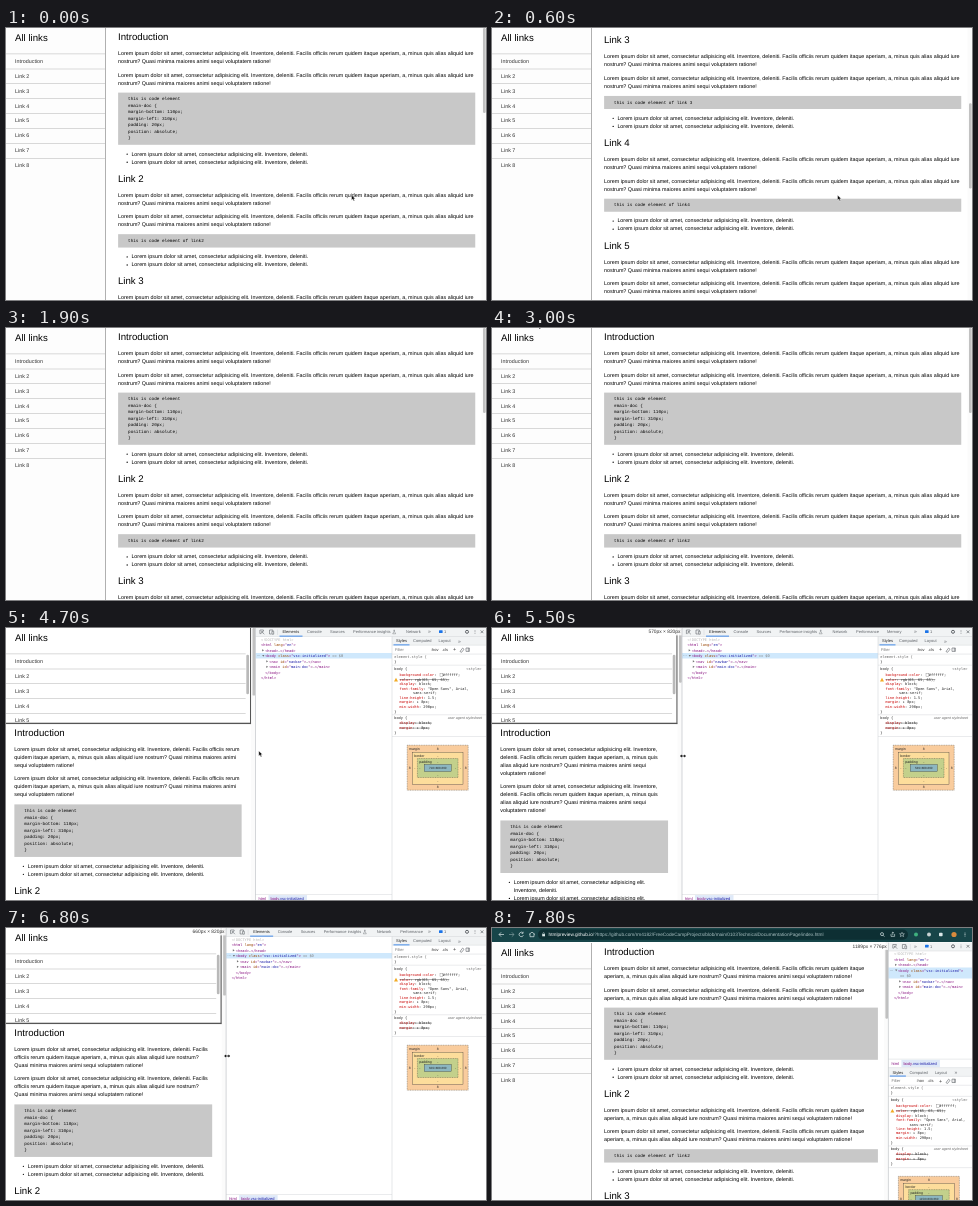
Write an HTML page that moves like this. It is 480x272 px and loops after 7.9 s.

```html
<!DOCTYPE html>
<html lang="en">
<head>
<meta charset="utf-8">
<title>Documentation page</title>
<style>
html, body { margin: 0; width: 100%; height: 100%; overflow: hidden; background: #fff; }
#stage { position: absolute; left: 0; top: 0; width: 480px; height: 272px; overflow: hidden; background: #fff; }
#view { position: absolute; left: 0; height: 272px; overflow: hidden; background: #fff; }
#page { position: absolute; left: 0; top: 0; height: 820px; transform-origin: 0 0; color: #000;
  font: 16px/1.5 "Liberation Sans", Arial, sans-serif; text-rendering: geometricPrecision; }
h2 { margin: 0; font-size: 28.8px; font-weight: 400; }
p, ul { margin: 16px 0; }
main ul { padding-left: 40px; }
main h2 { margin-top: 16px; }
main, nav { position: absolute; }
pre { margin: 16px 0; padding: 10px 30px; background: #c8c8c8; overflow: hidden;
  font: 13px/19.5px "Liberation Mono", "Courier New", monospace; }
nav { left: 0; top: 0; width: 296px; height: 100%; background: #fdfdfd; border-right: 2px solid #8a8a8a; overflow: hidden; }
nav h2 { position: absolute; left: 27px; top: 8px; }
nav ul { position: absolute; left: 0; right: 0; top: 77px; margin: 0; padding: 0; list-style: none; }
nav li { height: 43.5px; line-height: 43.5px; padding-left: 27px; border-top: 1px solid #8c8c8c; color: #333; }
nav i { position: absolute; display: none; right: 3px; top: 80px; width: 8px; height: 118px; border-radius: 4px; background: #b9b9b9; }
.narrow nav { height: 283px; background: #fff; border-right: 4px solid #555; border-bottom: 4px solid #555; }
.narrow nav ul { right: 13px; }
.narrow nav i { display: block; }
svg { position: absolute; left: 0; top: 0; }
svg text { white-space: pre; text-rendering: geometricPrecision; }
</style>
</head>
<body>
<div id="stage">
  <div id="view"><div id="page"><main></main><nav></nav></div></div>
  <svg id="ui" width="480" height="272" viewBox="0 0 480 272"></svg>
</div>
<script>
const LOOP = 7900, K = 0.3347, BAR = 14.5, DOC = 870;
const SANS = '"Liberation Sans", Arial, sans-serif';
const MONO = '"DejaVu Sans Mono", "Liberation Mono", monospace';
const $ = s => document.querySelector(s);
const view = $('#view'), page = $('#page'), main = $('main'), nav = $('nav'), ui = $('#ui');

// ---- page content
const lorem = 'Lorem ipsum dolor sit amet, consectetur adipisicing elit. Inventore, deleniti.';
const para = `<p>${lorem} Facilis officiis rerum quidem itaque aperiam, a, minus quis alias aliquid iure nostrum? Quasi minima maiores animi sequi voluptatem ratione!</p>`;
const names = ['Introduction', ...[2, 3, 4, 5, 6, 7, 8].map(n => 'Link ' + n)];
const code = i => i
  ? `this is code element of link${i === 2 ? ' ' : ''}${i + 1}`
  : 'this is code element\n#main-doc {\nmargin-bottom: 110px;\nmargin-left: 310px;\npadding: 20px;\nposition: absolute;\n}';
main.innerHTML = names.map((n, i) =>
  `<h2${i ? '' : ' style="margin:0"'}>${n}</h2>${para}${para}<pre>${code(i)}</pre><ul><li>${lorem}</li><li>${lorem}</li></ul>`).join('');
nav.innerHTML = '<h2>All links</h2><ul>' + names.map(n => `<li>${n}</li>`).join('') + '</ul><i></i>';

// ---- timing
const ease = u => u * u * (3 - 2 * u);
function track(t, keys, f = u => u) {
  if (t <= keys[0][0]) return keys[0][1];
  for (let i = 1; i < keys.length; i++) {
    const [a, x] = keys[i - 1], [b, y] = keys[i];
    if (t <= b) return x + (y - x) * f((t - a) / (b - a));
  }
  return keys[keys.length - 1][1];
}
const scrollAt = t => t < 700
  ? track(t, [[100, 0], [600, 241]], ease)
  : t < 1200 ? track(t, [[700, 241], [900, 598]]) : track(t, [[1200, 598], [1900, 0]], ease);
const barAt = t => track(t, [[2100, 0], [2400, 1], [2500, 1], [2900, 0], [7400, 0], [7700, 1]], ease);
const splitAt = t => t < 4200 ? 480
  : track(t, [[4800, 249.5], [5500, 190], [6000, 143], [6300, 121], [6500, 132], [7400, 396.4]]);

// ---- drawing helpers
const rect = (x, y, w, h, fill, more = '') => `<rect x="${x}" y="${y}" width="${w}" height="${h}" fill="${fill}" ${more}/>`;
const path = (d, stroke = '#5f6368', w = 0.7, fill = 'none') => `<path d="${d}" stroke="${stroke}" stroke-width="${w}" fill="${fill}"/>`;
const dot = (x, y, r, fill, more = '') => `<circle cx="${x}" cy="${y}" r="${r}" fill="${fill}" ${more}/>`;
const text = (x, y, s, size = 4, fill = '#333', font = SANS, more = '') =>
  `<text x="${x}" y="${y + size * 0.35}" font-size="${size}" fill="${fill}" font-family='${font}' ${more}>${s}</text>`;
const mono = (x, y, s, fill = '#222', more = '') => text(x, y, s, 3.6, fill, MONO, more);
const ink = (fill, s) => `<tspan fill="${fill}">${s}</tspan>`;
const TAG = '#881280';
const open = (tag, attr, val) => ink(TAG, '&lt;' + tag) +
  (attr ? ' ' + ink('#994500', attr) + ink(TAG, '="') + ink('#1a1aa6', val) + ink(TAG, '"') : '') + ink(TAG, '&gt;');
const close = tag => ink(TAG, `&lt;/${tag}&gt;`);
const arrow = (x, y, down) => path(down
  ? `M${x} ${y - 0.8}h2.2l-1.1 1.8z` : `M${x} ${y - 1.1}v2.2l1.8 -1.1z`, 'none', 0, '#6e6e6e');
const gear = (x, y) => dot(x, y, 1.5, 'none', 'stroke="#5f6368" stroke-width="1"');
const cross = (x, y) => path(`M${x - 1.4} ${y - 1.4}l2.8 2.8m0 -2.8l-2.8 2.8`);

// ---- developer tools
const tabs = [['Elements', 27, 17], ['Console', 51.5, 17], ['Sources', 74.5, 15], ['Performance insights', 97.5, 42],
  ['Network', 150.5, 16], ['Performance', 174, 24], ['Memory', 205, 15], ['Application', 228, 20], ['Security', 256, 15]];

function header(x, y) {
  let s = rect(x, y, 480 - x, 8.5, '#f1f3f4') + path(`M${x} ${y + 8.5}H480`, '#cacdd1', 0.4);
  s += path(`M${x + 8} ${y + 3}v-1h-3.6v3.6h1.2M${x + 6.2} ${y + 3.6}l2.6 2.6m-2.6 -2.6v1.8m0 -1.8h1.8`, '#5f6368', 0.6);
  s += path(`M${x + 14} ${y + 2}h3.4v1m-3.4 -1v4h1.8M${x + 16.4} ${y + 3.4}h1.8v2.8h-1.8z`, '#5f6368', 0.6);
  s += path(`M${x + 22} ${y + 1.5}v5.5`, '#cacdd1', 0.4);
  for (const [name, dx, w] of tabs) {
    if (x + dx + w > 420) break;
    s += text(x + dx, y + 3.8, name, 4, dx === 27 ? '#222' : '#5f6368');
    if (dx === 27) s += rect(x + dx - 3, y + 7.7, w + 6, 0.8, '#1a73e8');
    if (w === 42) s += path(`M${x + dx + 40.5} ${y + 2.2}h1.4m-1 0v1.4l-1.2 2.2h3l-1.2 -2.2v-1.4`, '#5f6368', 0.4);
  }
  s += text(422, y + 3.6, '»', 5, '#5f6368');
  s += rect(433, y + 2.2, 3.6, 2.8, '#1a73e8', 'rx=".5"') + text(438, y + 3.8, '1', 4, '#5f6368');
  s += gear(461, y + 3.8) + cross(476, y + 3.8);
  for (const d of [-1.4, 0, 1.4]) s += dot(469, y + 3.8 + d, 0.45, '#5f6368');
  return s;
}

function tree(x, y, right) {
  const wrap = right - x < 95, step = 5.5;
  const row = (n, dx, s, ar) => (ar ? arrow(x + dx - 3, y + n * step, ar === 2) : '') + mono(x + dx, y + n * step, s);
  const more = ink('#888', '…'), d = wrap ? 1 : 0;
  return mono(x + 5.5, y, '&lt;!DOCTYPE html&gt;', '#b5b5b5') +
    rect(x, y + 3 * step - 2.8, right - x, step * (1 + d), '#cfe8fc') +
    row(1, 5.5, open('html', 'lang', 'en')) +
    row(2, 9.7, open('head') + more + close('head'), 1) +
    text(x + 1, y + 3 * step - 1, '…', 4, '#5f6368') +
    row(3, 9.7, open('body', 'class', 'vsc-initialized') + (wrap ? '' : ink('#777', ' == $0')), 2) +
    (wrap ? row(4, 11.5, ink('#777', '== $0')) : '') +
    row(4 + d, 13.8, open('nav', 'id', 'navbar') + more + close('nav'), 1) +
    row(5 + d, 13.8, open('main', 'id', 'main-doc') + more + close('main'), 1) +
    row(6 + d, 9.7, close('body')) + row(7 + d, 5.5, close('html'));
}

function crumbs(x, y, right) {
  return rect(x, y, right - x, 8.5, '#fff') + path(`M${x} ${y}H${right}`, '#cacdd1', 0.4) +
    text(x + 3, y + 4, 'html', 4, TAG) + rect(x + 13, y + 0.6, 38.5, 7.4, '#dfe9f8') +
    text(x + 15, y + 4, ink(TAG, 'body') + '.vsc-initialized', 4, '#1a1aa6');
}

function boxModel(cx, y, w) {
  const ring = (hw, top, h, fill, label, n, dash) =>
    rect(cx - hw, y + top, hw * 2, h, fill, `stroke="#333" stroke-width=".35" ${dash ? 'stroke-dasharray="1 .7"' : ''}`) +
    (label ? text(cx - hw + 1.8, y + top + 3.3, label, 3.5, '#222') : '') +
    (n ? [[0, top + 3.4], [0, top + h - 2.9], [2.5 - hw, top + h / 2], [hw - 2.5, top + h / 2]]
      .map(([dx, dy]) => text(cx + dx, y + dy, n, 3.3, '#222', SANS, 'text-anchor="middle"')).join('') : '');
  return ring(30.5, 0, 45, '#f9cc9d', 'margin', '8', true) + ring(25.3, 7, 32, '#fddd9b', 'border', '-') +
    ring(20.3, 13.3, 19, '#c3d08b', 'padding', '-', true) + ring(13.5, 19.3, 7, '#8cb6c0') +
    text(cx, y + 22.8, `${Math.round((w - 5) * 3 - 16)}×808.660`, 3, '#222', SANS, 'text-anchor="middle"');
}

function styles(x, y, w) {
  const line = dy => path(`M${x} ${y + dy}H480`, '#cacdd1', 0.4);
  const prop = (dy, name, val, off) => mono(x + 7.5, y + dy, ink('#c80000', name) + ': ' + val + ';', '#222',
    off ? 'text-decoration="line-through"' : '');
  const plain = (dx, dy, s, fill) => mono(x + dx, y + dy, s, fill);
  return rect(x, y, 480 - x, 272, '#fff') + rect(x, y, 480 - x, 8.7, '#f1f3f4') + line(0) + line(8.7) + line(17.6) +
    text(x + 4, y + 4.5, 'Styles', 4, '#222') + rect(x + 1.5, y + 8, 16, 0.8, '#1a73e8') +
    text(x + 21, y + 4.5, 'Computed', 4, '#5f6368') + text(x + 46.5, y + 4.5, 'Layout', 4, '#5f6368') +
    text(x + 66, y + 4.3, '»', 5, '#5f6368') +
    text(x + 3, y + 13.2, 'Filter', 4, '#757575') + text(x < 392 ? 425 : x + 28, y + 13.2, ':hov', 4) +
    text(x < 392 ? 436 : x + 39, y + 13.2, '.cls', 4) + text(447, y + 13, '+', 5.4) +
    path(`M454 ${y + 15}l2.6 -3.4l1.4 1.2l-2.4 3z`, '#5f6368', 0.6) + path(`M460 ${y + 11.5}h3.4v3.4h-3.4zm2.3 0v3.4`, '#5f6368', 0.6) +
    plain(2.3, 20.5, 'element.style {', '#666') + plain(2.3, 25.5, '}') + line(28.7) +
    plain(2.3, 32.5, 'body {') + mono(475.5, y + 32.5, '&lt;style&gt;', '#666', 'text-anchor="end"') +
    prop(38.5, 'background-color', '  #ffffff') + rect(x + 48, y + 36.9, 2.8, 2.8, '#fff', 'stroke="#888" stroke-width=".4"') +
    path(`M${x + 2} ${y + 44.9}h4l-2 -3.6z`, 'none', 0, '#f2ab26') + prop(43, 'color', 'rgb(65, 65, 65)', true) +
    prop(47.7, 'display', 'block') +
    mono(x + 7.5, y + 52.3, ink('#c80000', 'font-family') + ': "Open Sans", Arial,') + plain(21, 56.6, 'sans-serif;') +
    prop(61, 'line-height', '1.5') + prop(65.5, 'margin', '▸ 8px') + prop(70, 'min-width', '290px') +
    plain(2.3, 75, '}') + line(78.3) + plain(2.3, 81, 'body {') +
    text(476, y + 81, 'user agent stylesheet', 3.6, '#666', SANS, 'font-style="italic" text-anchor="end"') +
    prop(86.3, 'display', 'block', true) + prop(91.3, 'margin', '▸ 8px', true) + plain(2.3, 96.5, '}') + line(100) +
    boxModel((x + 480) / 2 - 1.3, y + 108.7, w);
}

function devtools(x, top) {
  const stacked = x > 279;
  const cut = stacked ? top + (272 - top) * 0.486 : 272;
  const right = stacked ? 480 : 386;
  return rect(x, top, 480 - x, 272 - top, '#fff') + header(x, top) + tree(x, top + 11.3, right) +
    crumbs(x, stacked ? cut - 8.5 + 8.2 - 8.2 + top * 0 : 266.5, right) +
    (stacked ? styles(x, cut, x) : styles(386, top + 8.5, x) + path('M386 8.5V272', '#cacdd1', 0.5)) +
    path(`M${x} ${top}V272`, '#b8bbc0', 0.6);
}

// ---- browser bar and pointer
function browserBar(y) {
  const pale = '#dbe7e8', c = y + 6.5;
  return rect(0, y - 14, 480, 28, '#174549') + rect(46, y + 1.5, 370, 10.2, '#0d2f33', 'rx="5"') +
    path(`M12 ${c}h-5m2.2 -2.2l-2.2 2.2l2.2 2.2`, pale) + path(`M17 ${c}h5m-2.2 -2.2l2.2 2.2l-2.2 2.2`, '#7d9a9d') +
    path(`M31 ${c - 1.4}a2.2 2.2 0 1 0 .4 2m-.3 -3.4v1.6h-1.6`, pale) + path(`M37 ${c}l3 -2.4l3 2.4m-5 -.8v3h4v-3`, pale) +
    rect(50.2, c - 0.4, 2.8, 2.2, pale) + path(`M50.8 ${c}v-1a.8 .8 0 0 1 1.6 0v1`, pale, 0.5) +
    text(56.5, c, ink('#fff', 'htmlpreview.github.io') +
      '/?https://github.com/rm4182/FreeCodeCampProjects/blob/main/0103TechnicalDocumentationPage/index.html', 4.75, '#a9bfc1') +
    dot(390, c - 0.4, 1.5, 'none', `stroke="${pale}" stroke-width=".7"`) + path(`M391 ${c + 0.7}l1.4 1.4`, pale) +
    path(`M399 ${c - 0.5}v2.4h3.6v-2.4m-1.8 1.2v-3.2m-1.1 1.1l1.1 -1.1l1.1 1.1`, pale, 0.6) +
    path(`M410 ${c - 2.2}l.7 1.5h1.7l-1.3 1.1l.5 1.7l-1.6 -1l-1.6 1l.5 -1.7l-1.3 -1.1h1.7z`, pale, 0.5) +
    dot(424, c, 2, '#3fb27f') + dot(437, c, 2, '#c9d3d4') + rect(447, c - 1.8, 3.6, 3.6, pale, 'rx=".8"') +
    dot(462, c, 2.6, '#d98a3d') + [-1.6, 0, 1.6].map(d => dot(473, c + d, 0.5, pale)).join('');
}

const pointer = (x, y) => path(`M${x} ${y}v5l1.2 -1.1l.9 2l.9 -.4l-.9 -1.9h1.6z`, '#fff', 0.4, '#000');
const resizer = (x, y) => path(`M${x - 2} ${y}h4`, '#000', 0.8) +
  path(`M${x - 3} ${y}l1.7 -1.5v3zM${x + 3} ${y}l-1.7 -1.5v3z`, 'none', 0, '#000');

function cursor(t, x, top) {
  if (t < 1300) return pointer(345.6, 167.2);
  if (t < 3000) return '';
  if (t < 4000) return rect(47, 0, 1.4, 0.8, '#555');
  if (t <= 4700) {
    const u = ease((t - 3900) / 800);
    return pointer(47 + 205.8 * u, 123 * u);
  }
  if (t <= 7400) return resizer(x + 1, 128);
  return top < BAR ? pointer(x + 1, 128 * (1 - ease((t - 7400) / 300))) : '';
}

function render(t) {
  const top = BAR * barAt(t), x = splitAt(t), scroll = scrollAt(t);
  const narrow = x / K < 815, left = narrow ? 8.3 : 112;
  view.style.top = top + 'px';
  view.style.width = x + 'px';
  page.className = narrow ? 'narrow' : '';
  page.style.width = x / K + 'px';
  page.style.transform = `scale(${K})`;
  nav.style.width = narrow ? (x - 5.6) / K + 'px' : '';
  main.style.left = left / K + 'px';
  main.style.width = (x - left - (narrow ? 14 : 10.6)) / K + 'px';
  main.style.top = ((narrow ? 97.8 : 1.8) - scroll) / K + 'px';

  const tall = narrow ? main.offsetHeight * K + 105 : DOC, h = 272 - top;
  let s = rect(x - 4.4, top, 4.4, h, '#fbfbfb') +
    rect(x - 3, top + scroll * h / tall, 2.7, h * h / tall, '#c1c1c1', 'rx="1.2"');
  if (x < 480) s += devtools(x, top);
  if (t >= 5000) {
    const size = `${Math.round(x * 3)}px × ${Math.round(820 - top * 44 / BAR)}px`;
    s += rect(x - 37, top, 36.6, 7.4, '#fff', 'opacity=".85"') +
      text(x - 1.6, top + 3.7, size, 4.85, '#333', SANS, 'text-anchor="end"');
  }
  if (top > 0) s += browserBar(top - BAR);
  ui.innerHTML = s + cursor(t, x, top);
}

let last = -1;
const start = performance.now();
function tick() {
  const t = Math.floor(((performance.now() - start) % LOOP) / 100) * 100;
  if (t !== last) render(last = t);
  requestAnimationFrame(tick);
}
tick();
</script>
</body>
</html>
```
